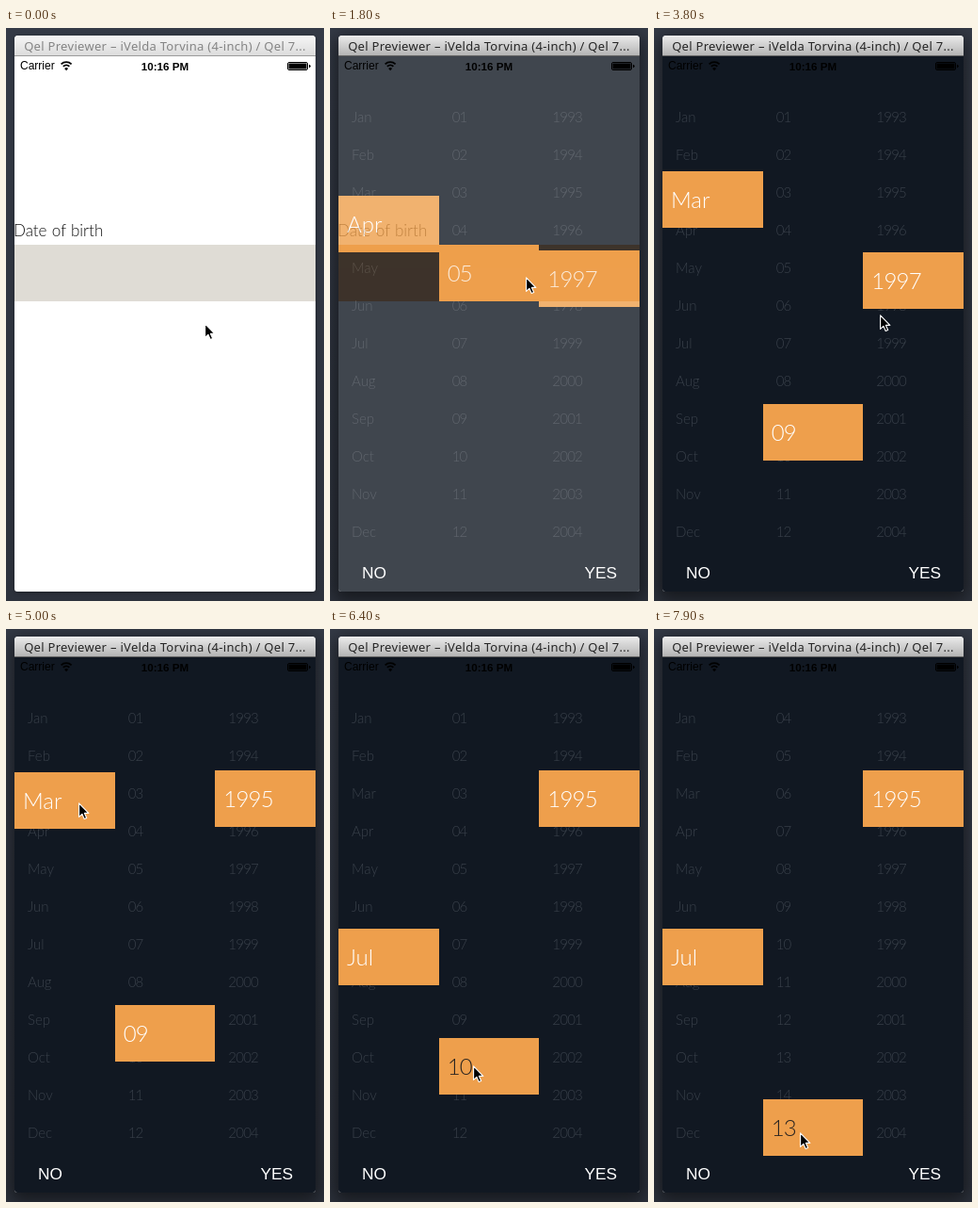
Animation, 338 px wide and 608 px high, one loop 8 s. Source, as an HTML page:

```html
<!DOCTYPE html>
<html lang="en">
<head>
<meta charset="utf-8">
<title>Date picker</title>
<style>
html, body { margin: 0; width: 100%; height: 100%; overflow: hidden; }
body { background: linear-gradient(#343a46, #2c313b); }
#stage { position: absolute; left: 0; top: 0; width: 338px; height: 608px; overflow: hidden; }
#stage div, #stage svg, .abs { position: absolute; white-space: pre; }
#win {
  left: 9px; top: 8px; width: 320px; height: 590px; border-radius: 4px 4px 3px 3px;
  background: #fff; box-shadow: 0 1px 4px rgba(0, 0, 0, .35);
}
#title {
  left: 0; top: 0; width: 320px; height: 21px; border-bottom: 1px solid #9b9b9b;
  border-radius: 4px 4px 0 0; background: linear-gradient(#f6f6f6, #dcdcdc);
  color: #858585; text-align: center;
  font: 13px/22px "Noto Sans", "Open Sans", sans-serif; letter-spacing: .3px;
}
.active #win { box-shadow: 0 5px 18px 4px rgba(0, 0, 0, .5); }
.active #title { background: linear-gradient(#ebebeb, #b4b4b4); border-color: #626262; color: #262626; }
#screen { left: 0; top: 22px; width: 320px; height: 568px; overflow: hidden; border-radius: 0 0 3px 3px; }
#label { left: -1px; top: 174px; color: #111; font: 300 17px/22px Lato, sans-serif; word-spacing: .7px; }
#field { left: 0; top: 200px; width: 320px; height: 60px; }
#picker { left: 0; top: 0; width: 320px; height: 568px; background: #111822; opacity: 0; }
.col { top: 44px; width: 106.67px; height: 480px; overflow: hidden; }
.list { left: 14px; top: 0; color: #39404a; font: 300 15px/40px Lato, sans-serif; }
.tile {
  width: 106.67px; height: 60px; background: #ee9f4c; color: #fff; text-indent: 9px;
  font: 300 24px/60px Lato, sans-serif;
}
.num { letter-spacing: -.8px; }
.tile.held { color: #2b2521; }
.btn { top: 537px; color: #fff; font: 17.3px/22px "Liberation Sans", Arial, sans-serif; }
.status { top: 3px; color: #000; font: 12px/15px "Liberation Sans", Arial, sans-serif; }
</style>
</head>
<body>
<div id="stage">
  <div id="win">
    <div id="title">Qel Previewer – iVelda Torvina (4-inch) / Qel 7...</div>
    <div id="screen">
      <div id="label">Date of birth</div>
      <div id="field"></div>
      <div id="picker">
        <div class="btn" style="left:25px">NO</div>
        <div class="btn" style="right:24px">YES</div>
      </div>
      <div class="status" style="left:6px">Carrier</div>
      <div class="status" style="left:0;width:320px;text-align:center;font-weight:bold;font-size:11.6px">10:16 PM</div>
      <svg width="320" height="20" style="left:0;top:0">
        <g fill="none" stroke="#000" stroke-width="1.8">
          <path d="M49.6 8.4a8 8 0 0 1 11 0M51.8 10.8a5 5 0 0 1 6.6 0"/>
          <path d="M55.1 15.2l-2-2.3a3 3 0 0 1 4 0z" fill="#000" stroke="none"/>
          <rect x="290.5" y="6.5" width="21" height="8" rx="1.5" stroke-width="1"/>
        </g>
        <rect x="291.5" y="7.5" width="19" height="6" rx=".5"/>
        <path d="M313 8.8q1.8 .4 1.8 1.7t-1.8 1.7z"/>
      </svg>
    </div>
  </div>
  <svg id="cursor" width="18" height="24" viewBox="-2 -2 18 24" style="left:-2px;top:-2px">
    <path d="M.6 .8V15.4L3.9 12.3L6.2 17.6L8.7 16.5L6.4 11.4H10.8Z"
      stroke="#fff" stroke-width="1.1" stroke-linejoin="round"/>
  </svg>
</div>
<script>
const LOOP = 8000, STEP = 100, ROW = 40, FIELD_TOP = 230, SCREEN_TOP = 30;
const $ = id => document.getElementById(id);
const pad = n => String(n).padStart(2, '0');
const months = 'Jan Feb Mar Apr May Jun Jul Aug Sep Oct Nov Dec'.split(' ');

// Piecewise linear track of [time, value] keys
function at(keys, t) {
  const i = keys.findIndex(k => k[0] > t);
  if (i === 0) return keys[0][1];
  if (i < 0) return keys[keys.length - 1][1];
  const [t0, a] = keys[i - 1], [t1, b] = keys[i];
  return a + (b - a) * (t - t0) / (t1 - t0);
}

const cursorX = [[800, 211], [1200, 208], [2300, 208], [2600, 205], [3300, 200], [3800, 240],
  [4000, 253], [4600, 253], [5000, 77], [5600, 80], [5900, 145], [6400, 152], [7100, 156], [7600, 155]];
const cursorY = [[800, 313], [1200, 264], [2300, 264], [2600, 339], [3100, 430], [3200, 433],
  [3400, 433], [3800, 304], [4000, 276], [4100, 272], [4600, 184], [5100, 184], [5600, 350],
  [5800, 389], [6000, 428], [6400, 463], [6700, 508], [7100, 545], [7600, 534]];
const fieldHeat = [[1400, 0], [1500, .35], [1700, 1]];
const pickerFade = [[1600, 0], [1700, .4], [1800, .8], [1900, 1]];
const dayScroll = [[7200, 0], [7500, 80], [7700, 106], [7900, 120]];

const columns = [
  { text: i => months[i], rows: 12, held: [[5100, 5600]],
    top: [[1600, FIELD_TOP], [1900, 151.7], [5100, 151.7], [5600, 318]] },
  { text: i => pad(i + 1), rows: 16, num: true, scroll: dayScroll, last: 12, held: [[2300, 3300], [6000, LOOP]],
    top: [[2300, FIELD_TOP], [2600, 305], [3100, 396], [3200, 399], [6000, 399], [6400, 434], [6700, 478], [7000, 499]] },
  { text: i => String(1993 + i), rows: 12, num: true, held: [[4100, 4700]],
    top: [[1600, FIELD_TOP], [1900, 238.4], [4100, 238.4], [4600, 150]] }
];

function add(parent, cls, left) {
  const el = document.createElement('div');
  el.className = cls;
  if (left !== undefined) el.style.left = left + 'px';
  return parent.appendChild(el);
}

columns.forEach((c, n) => {
  const left = n * 320 / 3, num = c.num ? ' num' : '';
  c.list = add(add($('picker'), 'col', left), 'list' + num);
  c.list.textContent = Array.from({ length: c.rows }, (_, i) => c.text(i)).join('\n');
  c.tile = add($('picker'), 'tile' + num, left);
});

const mix = (a, b, k) => `rgb(${a.map((v, i) => Math.round(v + (b[i] - v) * k))})`;

function draw(t) {
  $('stage').classList.toggle('active', t >= 1100);
  $('field').style.background = mix([223, 220, 213], [238, 159, 76], at(fieldHeat, t));
  $('picker').style.opacity = at(pickerFade, t);
  $('cursor').style.transform = `translate(${at(cursorX, t)}px, ${at(cursorY, t)}px)`;

  for (const c of columns) {
    const top = at(c.top, t), scroll = c.scroll ? at(c.scroll, t) : 0;
    const row = Math.round((top - 64) / ROW) + Math.floor(scroll / ROW);
    c.list.style.transform = `translateY(${-scroll}px)`;
    c.tile.style.top = top - SCREEN_TOP + 'px';
    c.tile.textContent = c.text(Math.min(row, c.last || 11));
    c.tile.classList.toggle('held', c.held.some(([a, b]) => t >= a && t < b));
  }
}

// The picture advances ten times a second
function tick() {
  draw(Math.floor(performance.now() % LOOP / STEP) * STEP);
  requestAnimationFrame(tick);
}
tick();
</script>
</body>
</html>
```
